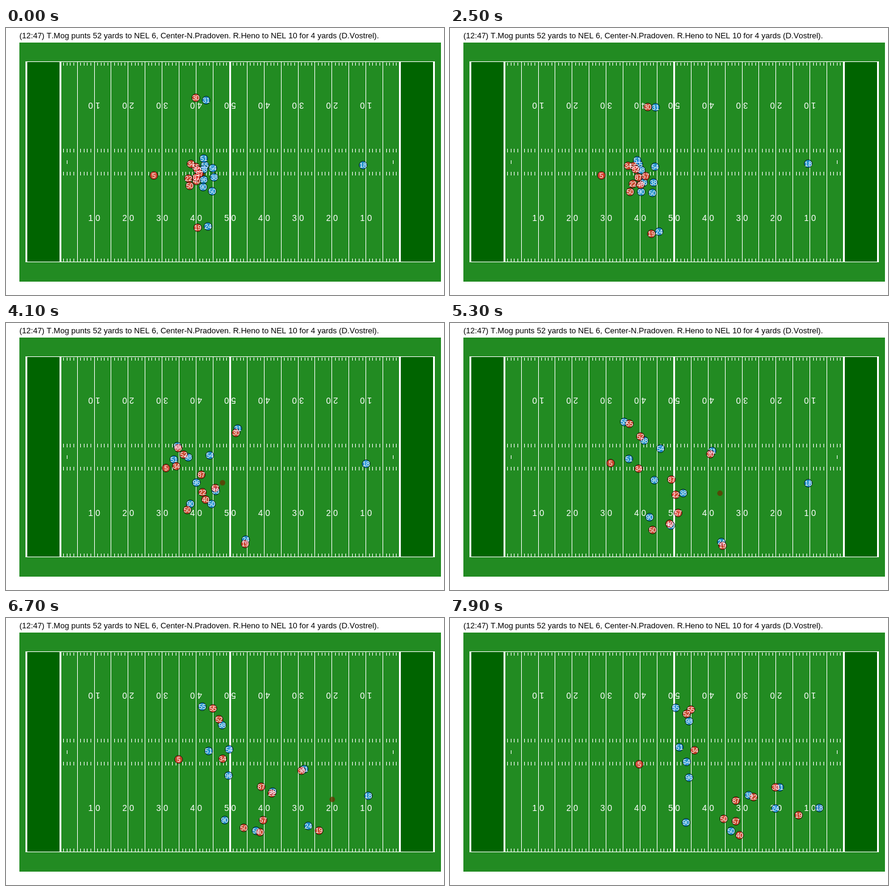
An HTML page that plays this animation: 720 by 440 pixels, repeating every 8 s.

```html
<!DOCTYPE html>
<html lang="en">
<head>
<meta charset="utf-8">
<title>Punt return</title>
<style>
  html, body { margin: 0; width: 100%; height: 100%; overflow: hidden; background: #fff; }
  svg { display: block; width: 720px; height: 440px; }
  text { font-family: "Liberation Sans", Arial, sans-serif; font-kerning: none; }
  .title { font-size: 13px; }
  .yards { font-size: 14px; fill: #fff; text-anchor: middle; }
  .jersey { font-size: 11px; fill: #fff; text-anchor: middle; }
  circle { fill-opacity: 0.75; stroke-opacity: 0.75; }
</style>
</head>
<body>
<svg viewBox="0 0 720 440">
  <rect width="720" height="440" fill="#fff"/>
  <text class="title" x="22" y="17">(12:47) T.Mog punts 52 yards to NEL 6, Center-N.Pradoven. R.Heno to NEL 10 for 4 yards (D.Vostrel).</text>
  <rect x="22" y="24" width="693" height="394" fill="#228b22"/>
  <g id="field"></g>
  <g id="ball"></g>
  <g id="blue"></g>
  <g id="red"></g>
  <g id="labels"></g>
</svg>
<script>
const LOOP = 8000, STEP = 100;
const SNAP = 1500, CAUGHT = 2200, KICK = 2800, END = 7900;

const layer = id => document.getElementById(id);

function add(parent, tag, attrs, text) {
  const el = document.createElementNS('http://www.w3.org/2000/svg', tag);
  for (const name in attrs) el.setAttribute(name, attrs[name]);
  if (text !== undefined) el.textContent = text;
  parent.appendChild(el);
  return el;
}

// ---- field ----
const TOP = 55, BOTTOM = 385, GOAL = 89.18, YARD = 5.584;
const field = layer('field');
const yardX = yard => Math.floor(GOAL + yard * YARD);
const bar = (x, y, width, height, fill = '#fff') => add(field, 'rect', { x, y, width, height, fill });

function drawField() {
  const left = yardX(-10), width = yardX(110) - left, height = BOTTOM - TOP;
  for (const yard of [-10, 100]) bar(yardX(yard), TOP, 56, height, '#006400');
  for (const y of [TOP, BOTTOM]) bar(left, y, width, 1);

  for (let yard = 1; yard < 100; yard++) {
    const x = yardX(yard);
    if (yard % 5 === 0) {
      bar(x, TOP, 1, height);
    } else {
      for (const y of [57, 380]) bar(x, y, 1, 5);
      for (const y of [199, 237]) bar(x, y, 1, 6);
    }
  }
  for (const yard of [-10, 0, 50, 100, 110]) bar(yardX(yard) - 1, TOP, 3, height + 1);
  for (const yard of [2, 98]) bar(yardX(yard), 218, 1, 6);

  for (let yard = 10; yard < 100; yard += 10) {
    const x = GOAL + yard * YARD;
    const label = Math.min(yard, 100 - yard) / 10 + ' 0';
    add(field, 'text', { class: 'yards', x, y: 318 }, label);
    add(field, 'text', { class: 'yards', transform: `translate(${x} 123) rotate(180)` }, label);
  }
}

// ---- motion: every path is a function from time to [x, y] ----
const KEYS = [SNAP, 4100, 5300, END];
const progress = (t, from, to) => Math.min(1, Math.max(0, (t - from) / (to - from)));
const mix = (a, b, u) => a.map((value, axis) => value + (b[axis] - value) * u);

// Smooth curve through the values at KEYS: starts at rest, ends freely.
function spline(values, t) {
  const slope = i => (values[i + 1] - values[i]) / (KEYS[i + 1] - KEYS[i]);
  const tangent = i => {
    if (i === 0) return 0;
    if (i === KEYS.length - 1) return (3 * slope(i - 1) - tangent(i - 1)) / 2;
    const u = (KEYS[i] - KEYS[i - 1]) / (KEYS[i + 1] - KEYS[i - 1]);
    return slope(i - 1) * (1 - u) + slope(i) * u;
  };
  let i = 0;
  while (i < KEYS.length - 2 && t >= KEYS[i + 1]) i++;
  const h = KEYS[i + 1] - KEYS[i], u = progress(t, KEYS[i], KEYS[i + 1]), v = 1 - u;
  return v * v * (1 + 2 * u) * values[i] + u * u * (3 - 2 * u) * values[i + 1]
    + h * u * v * (v * tangent(i) - u * tangent(i + 1));
}

const run = (...points) => t => [0, 1].map(axis => spline(points.map(p => p[axis]), t));

// Follows another path while the gap changes steadily.
const shadow = (leader, gapBefore, gapAfter) => t => {
  const gap = mix(gapBefore, gapAfter, progress(t, SNAP, END));
  return leader(t).map((value, axis) => value + gap[axis]);
};

// Snapped to the punter, held, then kicked and slowed by drag.
const flight = punter => t => {
  if (t < KICK) return mix([323, 242], punter(t), progress(t, SNAP, CAUGHT));
  const u = progress(t, KICK, END);
  return mix(punter(KICK), [607, 313], u * (1.2 - 0.2 * u));
};

const movers = [];

function player(team, number, path) {
  const fill = team === 'red' ? '#ff3030' : '#1e90ff';
  const dot = add(layer(team), 'circle', { r: 6.5, fill, stroke: '#000' });
  const label = add(layer('labels'), 'text', { class: 'jersey', y: 4 }, number);
  movers.push({ parts: [dot, label], path });
  return path;
}

drawField();

const punter = player('red', 5, run([243, 243], [263, 239], [264, 231], [311, 241]));
const guard = player('red', 55, run([312, 229], [283, 206], [295, 166], [396, 151]));
const tackle = player('red', 52, run([315, 234], [292, 217], [313, 187], [389, 158]));
const wing = player('red', 40, run([313, 252], [328, 291], [361, 331], [476, 358]));
const upback = player('red', 22, run([300, 248], [323, 279], [371, 283], [499, 295]));
player('red', 34, run([304, 224], [280, 236], [310, 240], [402, 218]));
player('red', 57, run([318, 240], [344, 272], [375, 313], [470, 335]));
player('red', 87, run([313, 246], [321, 250], [364, 258], [470, 301]));
player('red', 50, run([302, 260], [298, 308], [333, 341], [450, 331]));
player('red', 30, run([312, 115], [378, 181], [428, 216], [535, 279]));
player('red', 19, run([315, 329], [393, 364], [448, 367], [573, 325]));

player('blue', 55, shadow(guard, [15, -3], [-25, -3]));
player('blue', 98, shadow(tackle, [10, -1], [4, 12]));
player('blue', 50, shadow(wing, [26, 17], [-14, -7]));
player('blue', 38, shadow(upback, [42, -2], [-8, -3]));
player('blue', 51, run([325, 215], [276, 225], [294, 224], [377, 213]));
player('blue', 54, run([340, 231], [335, 218], [346, 207], [389, 237]));
player('blue', 96, run([325, 250], [313, 263], [336, 259], [393, 263]));
player('blue', 90, run([324, 262], [303, 298], [328, 320], [388, 337]));
player('blue', 31, run([329, 119], [381, 174], [431, 211], [542, 279]));
player('blue', 24, run([332, 327], [394, 357], [446, 361], [535, 314]));
player('blue', 18, run([587, 226], [592, 232], [589, 264], [607, 313]));

const ball = add(layer('ball'), 'circle', { r: 4.5, fill: '#663300' });
movers.push({ parts: [ball], path: flight(punter) });

function render(time) {
  const t = Math.floor((time % LOOP) / STEP) * STEP;
  for (const { parts, path } of movers) {
    const place = `translate(${path(t).map(value => value.toFixed(1)).join(' ')})`;
    for (const part of parts) part.setAttribute('transform', place);
  }
}

const began = performance.now();
function tick() {
  render(performance.now() - began);
  requestAnimationFrame(tick);
}
tick();
</script>
</body>
</html>
```
